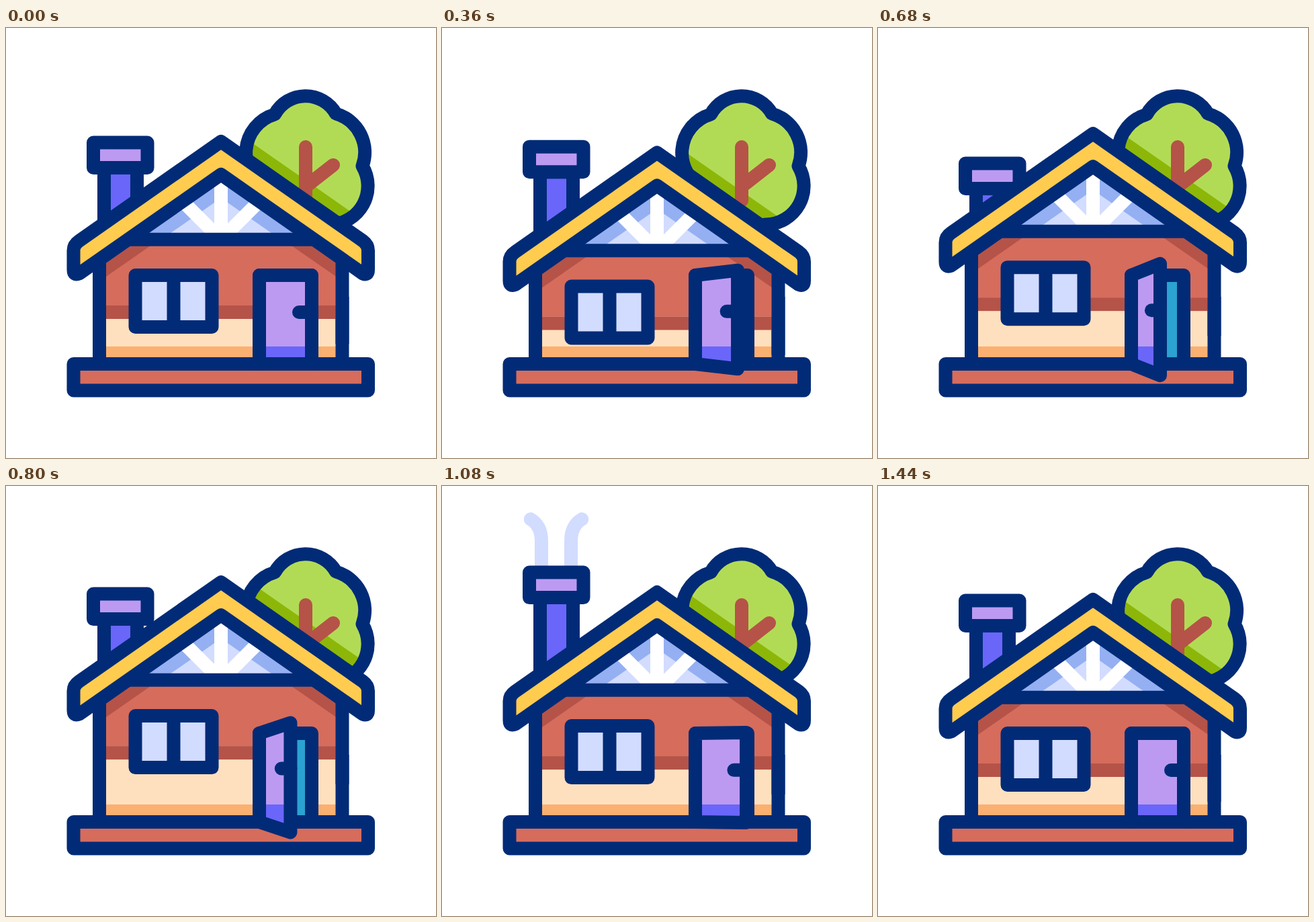
Animation of 640 by 640 pixels, one loop 1.56 s. Source, as an HTML page:

```html
<!DOCTYPE html>
<html lang="en">
<head>
<meta charset="utf-8">
<title>House</title>
<style>
  html, body { margin: 0; width: 100%; height: 100%; overflow: hidden; background: #fff; }
  svg { display: block; width: 100vw; height: 100vh; }
  .line { stroke: #022b77; stroke-width: 20; stroke-linejoin: round; fill: none; }
  .red { fill: #d66c5c; }
  .brick { fill: #b55348; }
  .yellow { fill: #ffcc4f; }
  .lilac { fill: #bc9af1; }
  .violet { fill: #6a66fa; }
  .pale { fill: #d2dcff; }
  .branch { stroke: #b55348; stroke-width: 20; stroke-linecap: round; fill: none; }
  .smoke { stroke: #d2dcff; stroke-width: 20; stroke-linecap: round; fill: none; }
  .ray { stroke: #fff; stroke-width: 20; fill: none; }
</style>
</head>
<body>
<svg viewBox="0 0 640 640">
  <defs>
    <path id="crown" d="M400 128.500A52 52 0 0 1 491 127.500A60 60 0 0 1 530.500 205.500A57.500 57.500 0 0 1 482 292.500L430 300L391 240A60 60 0 0 1 400 128.500Z"/>
    <clipPath id="crownClip"><use href="#crown"/></clipPath>
    <clipPath id="leafClip"><path id="leafShape"/></clipPath>
  </defs>

  <!-- tree -->
  <use href="#crown" fill="#b2db55"/>
  <g clip-path="url(#crownClip)">
    <path class="lift" fill="#8db708" d="M320 138.800L560 306V420H320Z"/>
  </g>
  <path class="branch" d="M446 177V257M446 236L487 204"/>
  <use href="#crown" class="line"/>

  <!-- smoke and chimney -->
  <g id="smoke">
    <path class="smoke" pathLength="100" d="M148 180V82C148 64 140 53 129 48C120 44.500 104 44.500 88 45"/>
    <path class="smoke" pathLength="100" d="M192 180V82C192 64 200 53 211 48C220 44.500 236 44.500 252 45"/>
  </g>
  <path id="stack" class="line violet"/>
  <rect id="cap" class="line lilac" x="130" y="170.500" width="80.500" height="37.500"/>

  <!-- walls -->
  <rect x="139" y="400" width="361" height="100" fill="#ffe0be"/>
  <rect x="139" y="474" width="361" height="26" fill="#fab071"/>
  <path class="line" d="M139 400V500M500.500 400V500"/>

  <!-- everything that rides with the roof -->
  <g class="lift">
    <rect class="red" x="139" y="315" width="361" height="98"/>
    <rect class="brick" x="139" y="413" width="361" height="20"/>
    <path class="brick" d="M139 377L228 315H139ZM500 376L412 315H500Z"/>
    <path class="line" d="M139 345V470M500.500 345V470"/>
    <rect class="line pale" x="192.500" y="368" width="114" height="77"/>
    <path class="line" d="M249.500 368V445"/>
    <path fill="#94b0f2" d="M320 220L445 310H195Z"/>
    <path class="pale" d="M320 253L402 310H238Z"/>
    <path class="ray" d="M320 315V225M320 315L262 257M320 315L378 257"/>
    <path class="line" d="M180 314.700H460"/>
    <path class="line yellow" d="M320 169L531 316.700Q539 322.500 539 331V360Q539 369 531 365.500L320 218L109 365.500Q100.500 369 100.500 360V331Q100.500 322.500 109 316.700Z"/>
  </g>

  <!-- step and door -->
  <rect class="line red" x="100.500" y="500" width="438.500" height="39.500"/>
  <rect x="377" y="368" width="78" height="122" fill="#2ba2d1"/>
  <path class="line" d="M377 500V368H455V500"/>
  <g clip-path="url(#leafClip)">
    <rect class="lilac" x="367" y="340" width="100" height="134"/>
    <rect class="violet" x="367" y="474" width="100" height="60"/>
  </g>
  <path id="leaf" class="line"/>
  <path id="knob" class="line" stroke-linecap="round"/>
</svg>
<script>
const LOOP = 1560;
const $ = id => document.getElementById(id);

// Cubic Bezier easing, solved by bisection
function bezier(x1, y1, x2, y2) {
  const at = (a, b, s) => 3 * (1 - s) * (1 - s) * s * a + 3 * (1 - s) * s * s * b + s * s * s;
  return x => {
    let lo = 0, hi = 1;
    for (let i = 0; i < 24; i++) {
      const mid = (lo + hi) / 2;
      if (at(x1, x2, mid) < x) lo = mid; else hi = mid;
    }
    return at(y1, y2, lo);
  };
}

const even = bezier(.33, 0, .67, 1);
const soft = bezier(.33, 0, .5, 1);
const late = bezier(.33, 0, .6, 1);
const quick = bezier(.33, 0, .42, 1);
const firm = bezier(.6, 0, .5, 1);
const out = bezier(.33, .67, .67, 1);

// Each step: start, end, value reached, easing
const tracks = {
  roof: [[80, 480, 20, late], [480, 880, -28, quick], [880, 1280, 0, soft]],
  chimney: [[290, 590, 36, soft], [600, 960, -48, firm], [1000, 1400, 0, soft]],
  door: [[180, 640, 35, soft], [720, 1140, 0, even]],
  head: [[920, 1240, 100, out]],
  tail: [[1080, 1440, 100, even]]
};

function value(track, t) {
  let v = 0;
  for (const [from, to, target, ease] of track) {
    if (t <= from) break;
    if (t < to) return v + (target - v) * ease((t - from) / (to - from));
    v = target;
  }
  return v;
}

const lifted = document.querySelectorAll('.lift');
const wisps = document.querySelectorAll('.smoke');

function draw(t) {
  const roof = value(tracks.roof, t);
  lifted.forEach(el => el.setAttribute('transform', `translate(0 ${roof})`));

  const rise = value(tracks.chimney, t);
  $('cap').setAttribute('transform', `translate(0 ${rise})`);
  $('stack').setAttribute('d', `M146 330V${208 + rise}H195V330`);

  const swing = value(tracks.door, t);
  const edge = 455 - swing, skew = .49 * swing;
  const leaf = `M377 368L${edge} ${368 - skew}V${500 + skew}L377 500Z`;
  $('leaf').setAttribute('d', leaf);
  $('leafShape').setAttribute('d', leaf);
  const knobY = 423 - .08 * swing;
  $('knob').setAttribute('d', `M${edge - 19 + .17 * swing} ${knobY}H${edge}`);

  const tail = value(tracks.tail, t);
  const length = value(tracks.head, t) - tail;
  $('smoke').setAttribute('visibility', length > .1 ? 'visible' : 'hidden');
  wisps.forEach(el => {
    el.setAttribute('stroke-dasharray', `${Math.max(length, 0)} 300`);
    el.setAttribute('stroke-dashoffset', -tail);
  });
}

function tick(now) {
  draw(now % LOOP);
  requestAnimationFrame(tick);
}
draw(0);
requestAnimationFrame(tick);
</script>
</body>
</html>
```
